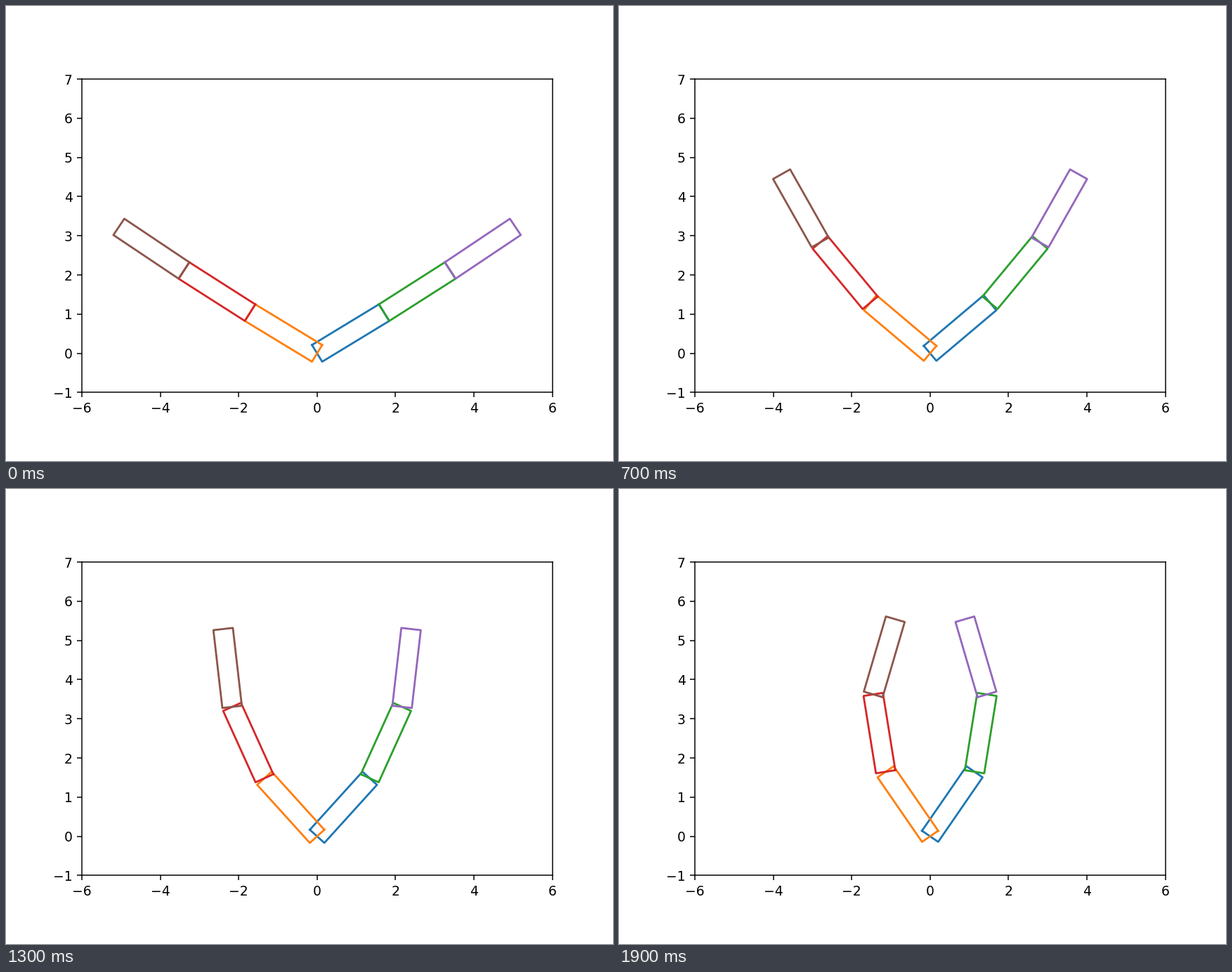
Animation of 864x648 px, one loop 2000 ms. Source, as a matplotlib script:

```python
import numpy as np
import matplotlib.pyplot as plt
from matplotlib.animation import FuncAnimation

FRAMES, INTERVAL = 20, 100
LENGTH, WIDTH = 2.0, 0.5
BASE = np.radians(30)
STEP = np.radians(1.2725)
LINKS = 3

fig, ax = plt.subplots(figsize=(6.4, 4.8), dpi=135)
ax.set_aspect("equal")
ax.set_xlim(-6, 6)
ax.set_ylim(-1, 7)
ax.set_xticks(range(-6, 7, 2))
ax.set_yticks(range(-1, 8))

# Pairs of (right, left) links, from the base outwards
lines = [ax.plot([], [], color=f"C{i}", lw=1.5)[0] for i in range(2 * LINKS)]


def link_outline(start, angle):
    """Closed rectangle whose short side is centred on start, and its far end."""
    along = LENGTH * np.array([np.cos(angle), np.sin(angle)])
    side = WIDTH / 2 * np.array([-np.sin(angle), np.cos(angle)])
    end = start + along
    corners = [start + side, start - side, end - side, end + side, start + side]
    return np.array(corners), end


def update(frame):
    bend = STEP * (frame + 1)
    joint = np.zeros(2)
    for n in range(LINKS):
        outline, joint = link_outline(joint, BASE + (n + 1) * bend)
        x, y = outline.T
        lines[2 * n].set_data(x, y)
        lines[2 * n + 1].set_data(-x, y)
    return lines


def init():
    return update(0)


anim = FuncAnimation(fig, update, frames=FRAMES, init_func=init,
                     interval=INTERVAL, repeat=True, repeat_delay=0)
plt.show()
```
